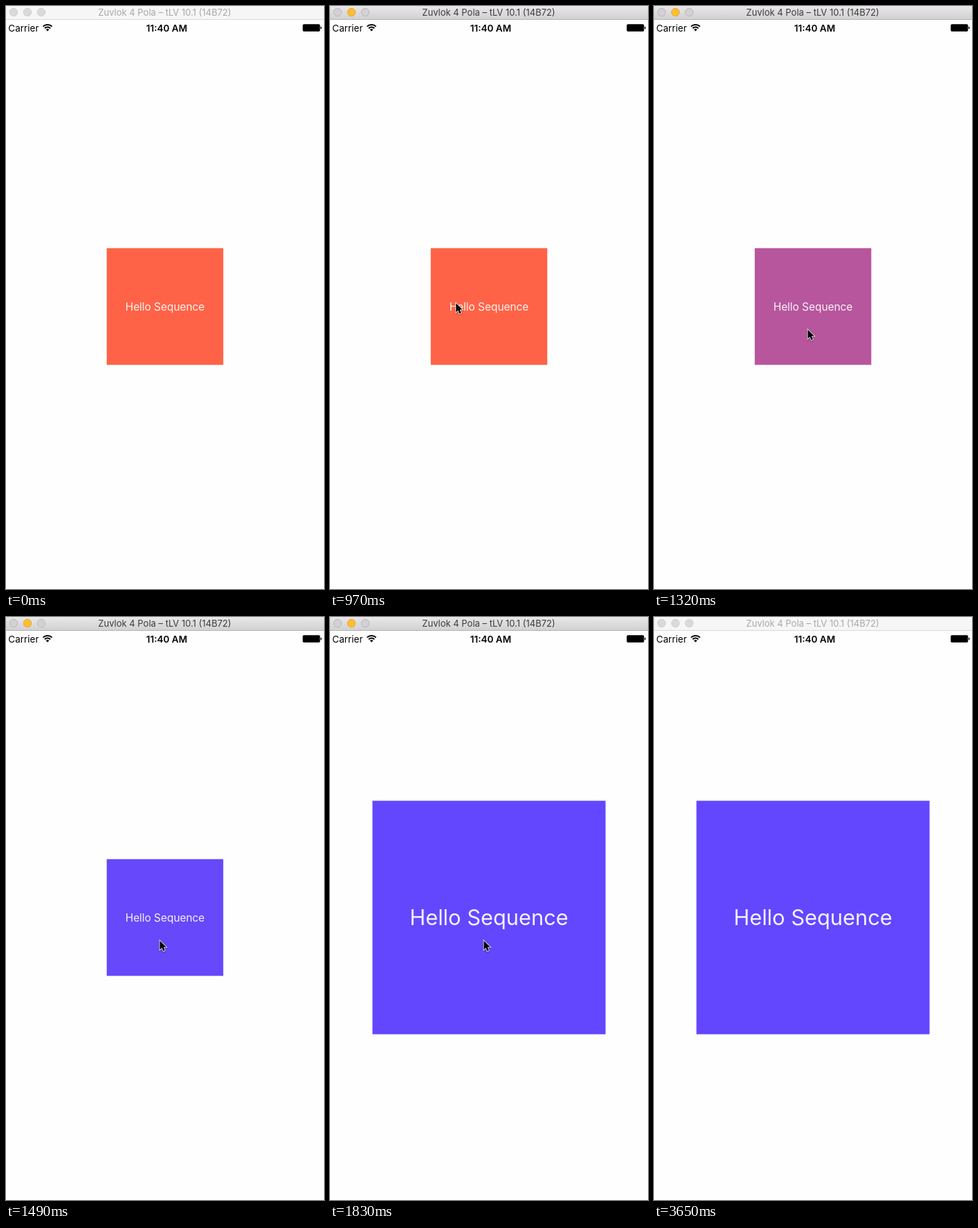
Write an HTML page that moves like this. It is 460 by 842 pixels and loops after 3.71 s.

```html
<!DOCTYPE html>
<html lang="en">
<head>
<meta charset="utf-8">
<style>
  html, body { margin: 0; width: 100%; height: 100%; overflow: hidden; background: #fefefe; }
  svg { display: block; }
  text { font-family: Inter, Roboto, sans-serif; }
  #bar { fill: #f6f6f6; }
  #edge { fill: #d9d9d9; }
  #title { font-size: 13px; fill: #a8a8a8; }
  .dot { fill: #dadada; stroke: #d0d0d0; }
  .active #bar { fill: url(#metal); }
  .active #edge { fill: #b4b2b4; }
  .active #title { fill: #3c3b3c; }
  .active .dot { fill: #d3d1d3; stroke: #bab8ba; }
  .active .yellow { fill: #fdbe2e; stroke: #e6a935; }
  #cursor { stroke: #fff; stroke-width: 1.5; paint-order: stroke; filter: drop-shadow(0 1px 1px #0005); }
</style>
</head>
<body>
<svg id="stage" width="460" height="842" viewBox="0 0 460 842">
  <defs>
    <linearGradient id="metal" x2="0" y2="1">
      <stop stop-color="#e9e7e9"/><stop offset="1" stop-color="#d2d0d2"/>
    </linearGradient>
  </defs>
  <rect width="460" height="842" fill="#fefefe"/>

  <rect id="bar" width="460" height="19"/>
  <rect id="edge" y="19" width="460" height="1"/>
  <circle class="dot" cx="11" cy="9" r="5.7"/>
  <circle class="dot yellow" cx="31" cy="9" r="5.7"/>
  <circle class="dot" cx="51" cy="9" r="5.7"/>
  <text id="title" x="229.5" y="14" text-anchor="middle">Zuvlok 4 Pola – tLV 10.1 (14B72)</text>

  <text x="3.3" y="36.5" font-size="13.5">Carrier</text>
  <g fill="none" stroke="#000" stroke-width="2">
    <path d="M53.6 29.6a9.2 9.2 0 0 1 13 0M56 32.3a5.8 5.8 0 0 1 8.2 0"/>
    <path d="M60.1 36.5l-2.3-2.4a3.3 3.3 0 0 1 4.6 0z" fill="#000" stroke="none"/>
  </g>
  <text x="232.5" y="36.5" font-size="13.5" font-weight="600" text-anchor="middle">11:40 AM</text>
  <rect x="429.5" y="26.5" width="24.5" height="10" rx="1.5" stroke="#000" stroke-opacity=".5"/>
  <path d="M455 29.5q1.6.5 1.6 2t-1.6 2z"/>

  <g id="box">
    <rect id="fill" x="-84.3" y="-84.3" width="168.6" height="168.6"/>
    <text y="5.7" font-size="15.4" fill="#fff" fill-opacity=".93" text-anchor="middle">Hello Sequence</text>
  </g>

  <path id="cursor" d="M0 0V13L3 10.2 5 15 7.4 14 5.4 9.3H9.3Z"/>
</svg>
<script>
const LOOP = 3710, REFRESH = 56, PHASE = 34;
const $ = id => document.getElementById(id);

const mix = (a, b, k) => a + (b - a) * k;
const progress = (t, start, end) => Math.min(1, Math.max(0, (t - start) / (end - start)));
const easeOut = k => k * (2 - k);
const easeInOut = k => k * k * (3 - 2 * k);

// The pointer rests between these moves
const entry = { x: 185, y: 824 };
const moves = [
  { start: 250, end: 500, x: 287, y: 576 },
  { start: 650, end: 950, x: 181, y: 428 },
  { start: 950, end: 1150, x: 222.5, y: 467.5 },
  { start: 2310, end: 2550, x: 470, y: 830 },
];

function pointerAt(t) {
  return moves.reduce((p, move) => {
    const k = easeInOut(progress(t, move.start, move.end));
    return { x: mix(p.x, move.x, k), y: mix(p.y, move.y, k) };
  }, entry);
}

function draw(time) {
  $('stage').classList.toggle('active', time >= 250 && time < 3650);

  // The box advances in screen refreshes
  const t = Math.floor((time - PHASE) / REFRESH) * REFRESH + PHASE;
  const hue = easeOut(progress(t, 1160, 1555));
  const scale = 1 + easeInOut(progress(t, 1564, 1814));
  $('fill').setAttribute('fill', `rgb(${mix(255, 99, hue)},${mix(99, 71, hue)},${mix(71, 255, hue)})`);
  $('box').setAttribute('transform', `translate(230 434) scale(${scale})`);

  const { x, y } = pointerAt(time);
  $('cursor').setAttribute('transform', `translate(${x} ${y})`);
  $('cursor').setAttribute('visibility', time >= 250 && time < 2550 ? 'visible' : 'hidden');
}

const begin = performance.now();
function loop() {
  draw((performance.now() - begin) % LOOP);
  requestAnimationFrame(loop);
}
loop();
</script>
</body>
</html>
```
